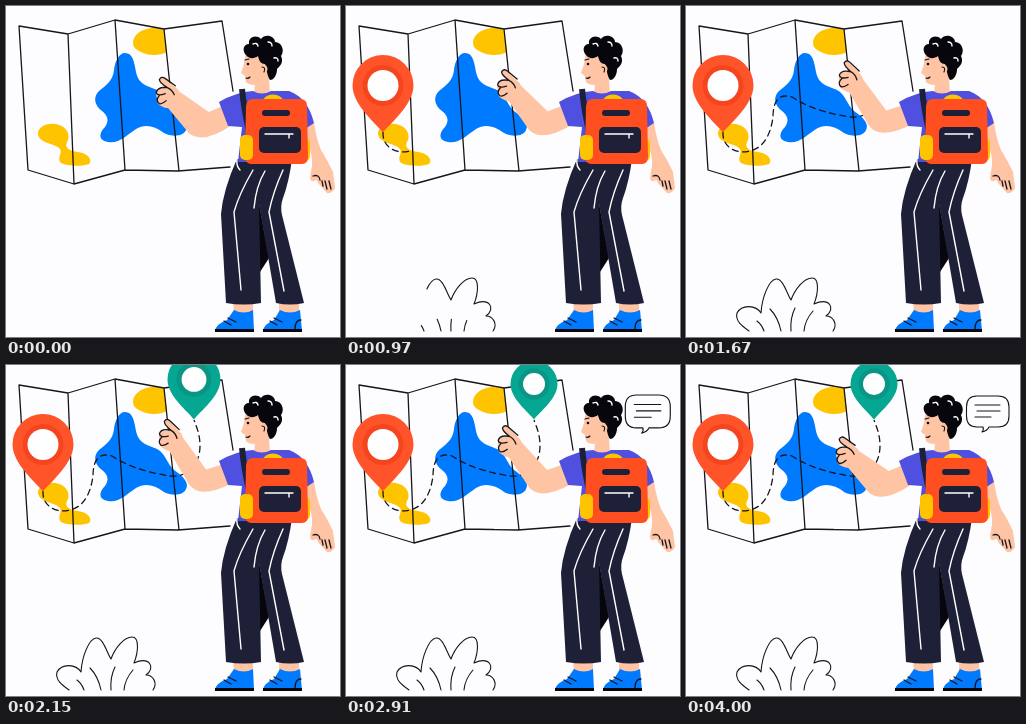
An HTML page for the animation above (4030 ms loop, 334 by 331 pixels).

```html
<!DOCTYPE html>
<html lang="en">
<head>
<meta charset="utf-8">
<title>Planning a route</title>
<style>
html, body { margin: 0; width: 100%; height: 100%; overflow: hidden; background: #fdfcfe; }
svg { display: block; width: 334px; height: 331px; }
.ink { fill: none; stroke: #15151c; stroke-width: 1.3; stroke-linecap: round; stroke-linejoin: round; }
.thin { stroke-width: 1.1; }
.chalk { fill: none; stroke: #fff; stroke-width: 1.4; stroke-linecap: round; stroke-linejoin: round; }
.skin { fill: #ffc4a3; }
.navy { fill: #1e2038; }
.shirt { fill: #4f50df; }
.orange { fill: #ff4e20; }
.yellow { fill: #ffc400; }
.blue { fill: #007aff; }
.dark { fill: #06060c; }
</style>
</head>
<body>
<svg viewBox="0 0 334 331">
  <defs>
    <mask id="reveal" maskUnits="userSpaceOnUse" x="0" y="0" width="334" height="331">
      <path id="routeMask" fill="none" stroke="#fff" stroke-width="6"/>
    </mask>
  </defs>

  <g id="map">
    <path class="yellow" d="M127 37C127 29 135 23 146 22Q154 21 158 24L161 46C154 50 142 50 135 46Q127 43 127 37Z"/>
    <path class="yellow" d="M32 127C33 119 45 116 53 119C61 121 65 130 61 136C58 142 64 145 72 146C82 147 87 154 83 158C76 161 61 160 55 157C50 152 58 146 53 142C47 137 32 137 32 127Z"/>
    <path class="blue" d="M119 47C127 47 128 56 130 66C133 80 143 80 151 84C160 89 161 99 168 105C175 110 184 117 180 124C177 131 166 131 158 127C148 119 138 118 130 123C121 129 113 138 102 136C91 134 94 126 99 121C104 114 101 109 96 105C88 99 87 91 93 85C101 79 107 74 108 64C109 55 113 47 119 47Z"/>
    <path class="ink" d="M227 85L216 15L158 23L109 14L62 28L13 20L22 164L68 178L119 164L172 165L224 161M62 28L68 178M109 14L119 164M158 23L173 165"/>
  </g>

  <path id="route" class="ink" stroke-dasharray="6 4.5" mask="url(#reveal)"/>
  <g id="redPin"></g>
  <g id="greenPin"></g>

  <g id="bush" class="ink thin">
    <path pathLength="1" d="M147 325C152 318 147 310 140 310C150 303 144 291 128 298C132 288 134 272 126 272C118 272 109 283 105 294C101 288 97 272 90 273C83 274 76 291 75 307C70 299 56 298 51 307C49 315 56 320 63 325"/>
    <path pathLength="1" d="M78 325Q76 319 71 315"/>
    <path pathLength="1" d="M95 325Q92 311 84 303"/>
    <path pathLength="1" d="M105 325Q104 312 109 302"/>
    <path pathLength="1" d="M118 325Q119 314 127 305"/>
  </g>

  <g id="bubble">
    <path class="ink thin" d="M291 31H312Q323 31 323 42V51Q323 62 312 62H303Q301 66 296 67Q298 65 297 62H291Q280.500 62 280.500 51V42Q280.500 31 291 31Z"/>
    <path class="ink thin" d="M289 40H314M291 46H314M289 52H305"/>
  </g>

  <g id="legs">
    <path class="skin" d="M227 294H247V308H228ZM273 294H293V308H273Z"/>
    <path class="blue" d="M228 304Q238 309 247 304L248 325H209Q210 318 221 314ZM274 304Q284 309 294 304L296 325H257Q258 318 268 314Z"/>
    <path class="dark" d="M209 323H248V326H209ZM257 323H296V326H257Z"/>
    <path class="ink" d="M222 312L230 316M218 315L225 319M268 312L276 316M264 315L271 319M295 314Q289 314 289 323"/>
    <path class="dark" d="M250 180L263 252L254 266Z"/>
    <path class="navy" d="M231 153H286Q283 176 277 192Q274 200 276 209L298 297Q284 300 270 297L253 198L255 297Q238 300 220 297L215 208Q217 184 231 153Z"/>
    <path class="chalk" d="M247 164Q233 188 228 206L235 284M259 165Q250 180 248 202M277 164Q267 186 263 206L278 285M231 153Q230 160 234 164"/>
  </g>

  <g id="farArm">
    <path class="skin" d="M298 120L308 116Q310 132 315 144Q322 155 327 166L329 182Q326 188 321 187L312 177Q311 172 308 175Q304 176 304 171L306 160Q307 150 301 135Z"/>
    <path class="ink" d="M307 170Q313 168 314 174M317 180L316 175M321 183L319 175M325 183L323 175"/>
  </g>

  <path id="arm" class="skin"/>
  <g id="hand">
    <path class="skin" d="M155 73Q158 72 161 76L172 85Q177 93 171 99Q163 106 156 102Q150 100 151 94Q148 89 152 85L160 83L154 79Q152 76 155 73Z"/>
    <path class="ink" d="M169 81L159 74Q155 71 153 75Q153 78 161 83M161 83Q151 82 150 88Q151 92 159 89M153 91Q149 96 153 99Q156 100 160 96M161 83Q166 85 168 90"/>
  </g>

  <g id="head">
    <path class="skin" d="M240 45L268 51L263 72L264 91Q252 94 248 87L249 79Q242 79 240 76L239 70L235 67L238 58Z"/>
    <path class="dark" d="M240 49C236 45 237 38 243 38C242 31 250 28 255 33C259 27 269 30 269 36C276 36 279 45 275 50C278 56 274 60 271 63C271 69 268 74 264 74C261 70 261 63 259 58C255 58 253 55 252 50C248 53 243 53 240 49Z"/>
    <circle class="skin" cx="257" cy="63" r="4.500"/>
    <path class="ink thin" d="M256 61Q260 61 258 66M239 54L243 53M240 72Q242 73 244 71"/>
    <circle class="dark" cx="242" cy="58" r="1.3"/>
    <path class="chalk thin" d="M247 38Q251 36 252 40M262 36Q266 36 266 40M268 52Q272 51 272 55"/>
  </g>

  <g id="torso">
    <path class="shirt" d="M213 96Q230 86 247 85Q256 90 265 85H283Q302 92 308 117L299 123L297 156H232L236 121L222 120Z"/>
    <path fill="none" stroke="#1e2038" stroke-width="6" d="M236 83Q238 104 244 130"/>
    <ellipse class="yellow" cx="267" cy="95" rx="10" ry="6.500"/>
    <rect class="yellow" x="292" y="132" width="12" height="23" rx="5"/>
    <path class="orange" d="M247 93H294Q301 93 301 100L302 151Q302 158 296 158H245Q239 157 239 151L240 100Q241 93 247 93Z"/>
    <rect class="yellow" x="234" y="129" width="13" height="25" rx="5"/>
    <rect class="navy" x="256" y="104" width="28" height="6" rx="3"/>
    <rect class="navy" x="253" y="121" width="42" height="26" rx="5"/>
    <path class="chalk" d="M259 128H287M283 128V132"/>
  </g>
</svg>

<script>
const LOOP = 4030;
const SWING = LOOP / 3;
const $ = id => document.getElementById(id);
const clamp = x => Math.max(0, Math.min(1, x));
const ease = x => x * x * (3 - 2 * x);
const mix = (a, b, k) => a + (b - a) * k;
const span = (t, from, to) => clamp((t - from) / (to - from));

const ROUTE = "M37 126C36 140 49 149 64 145C80 141 85 125 87 111C87 95 93 87 106 91C124 103 145 108 164 111C182 113 194 99 194 81C194 70 191 63 188 55";
$("route").setAttribute("d", ROUTE);
$("routeMask").setAttribute("d", ROUTE);
$("routeMask").setAttribute("pathLength", 1);

// Teardrop with its tip at the origin
function pin(r, d, hole, rim, fill, shade) {
  return `<path fill="${fill}" d="M0 0C-5 -7 ${-r} ${-d * .58} ${-r} ${-d}A${r} ${r} 0 1 1 ${r} ${-d}C${r} ${-d * .58} 5 -7 0 0Z"/>
    <circle cy="${-d}" r="${rim}" fill="${shade}"/><circle cy="${-d}" r="${hole}" fill="#fff"/>`;
}
$("redPin").innerHTML = pin(30.5, 47, 15.5, 20.5, "#ff5329", "#f5451f");
$("greenPin").innerHTML = pin(23.5, 35.5, 11, 15.5, "#05a793", "#0a9584");

// Grow past full size, then settle
function pop(t) {
  return t < 310 ? 1.16 * ease(span(t, 0, 310)) : mix(1.16, 1, ease(span(t, 310, 800)));
}

function place(id, x, y, scale, rest = "") {
  $(id).style.display = scale > 0 ? "" : "none";
  $(id).setAttribute("transform", `translate(${x} ${y}) scale(${scale}) ${rest}`);
}

// Stroke drawn from its first point up to share p
function trace(path, p) {
  path.style.display = p > 0 ? "" : "none";
  path.style.strokeDasharray = `${p} 2`;
}

// Inner elbow, wrist top, wrist bottom, outer elbow, elbow bend, armpit
const ARM_LOW = [203, 106, 172, 86, 160, 101, 183, 128, 197, 139, 226, 119];
const ARM_HIGH = [199, 104, 177, 65, 163, 78, 183, 116, 192, 133, 226, 118];

function bendArm(lift) {
  const p = ARM_LOW.map((v, i) => mix(v, ARM_HIGH[i], lift));
  $("arm").setAttribute("d", `M224 97L${p.slice(0, 8)}Q${p.slice(8)}Z`);
  $("hand").setAttribute("transform",
    `translate(${3 * lift} ${-23 * lift}) rotate(${12 * lift} 168 95)`);
}

function draw(t) {
  bendArm((1 - Math.cos(2 * Math.PI * (t + 100) / SWING)) / 2);

  place("redPin", 37, 126.5, pop(t - 20));
  place("greenPin", 188, 54.5, pop(t - 1700));
  place("bubble", 301, 48, pop(t - 2310), "translate(-301 -48)");

  trace($("routeMask"), span(t, 783, 1950));
  [...$("bush").children].forEach((path, i) =>
    trace(path, ease(i ? span(t, 650, 1300) : span(t, 450, 1300))));
}

function tick() {
  draw(performance.now() % LOOP);
  requestAnimationFrame(tick);
}
tick();
</script>
</body>
</html>
```
